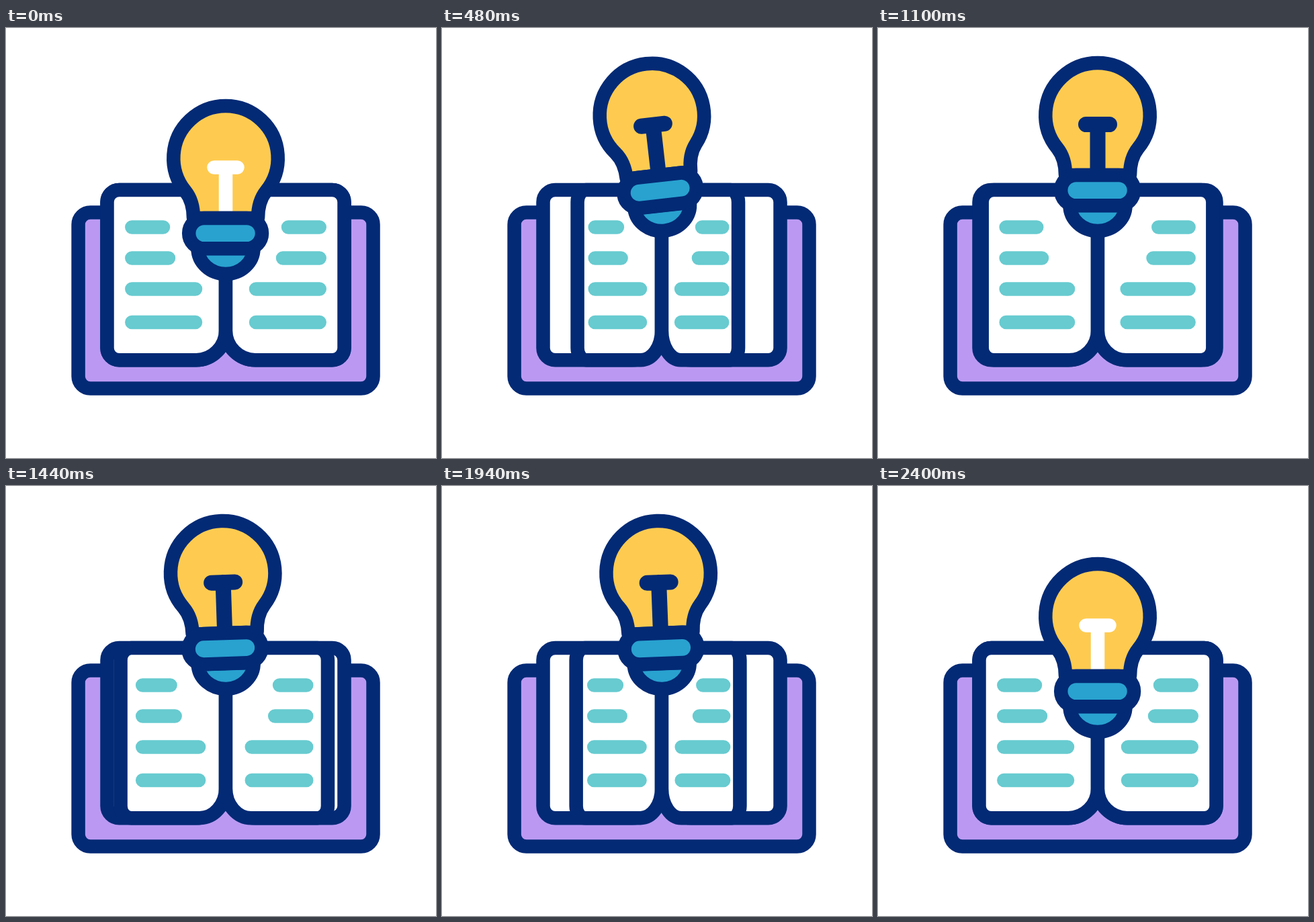
These frames come from a looping animation (640 by 640 pixels, 2620 ms). An HTML page with a canvas:

```html
<!DOCTYPE html>
<html lang="en">
<head>
<meta charset="utf-8">
<title>Book and bulb</title>
<style>
html, body { margin: 0; width: 100%; height: 100%; overflow: hidden; background: #fff; }
canvas { display: block; width: 640px; height: 640px; }
</style>
</head>
<body>
<canvas id="stage" width="640" height="640"></canvas>
<script>
const ctx = document.getElementById('stage').getContext('2d');
const LOOP = 2620, STEP = 20, END = 2400;
const NAVY = '#032a75', PURPLE = '#bb99f3', TEAL = '#67cbd0';
const YELLOW = '#fecb50', BLUE = '#29a2d0', WHITE = '#fff';
const LINE = 20.5, MID = 327;

// [time, value] keys, eased in and out between neighbours
const LIFT = [[0, 0], [400, 64], [2000, 64], [2400, 0]];
const TILT = [[0, 0], [400, -10], [600, 0], [1300, 0], [1800, -10], [2000, 0]];
const FOLD = [[0, 0], [600, 1], [1200, 0], [1800, 1], [2400, 0]];

// [y, inner end measured from the fold]
const TEXT_LINES = [[296.5, 93], [342.5, 85], [388.5, 45], [438, 45]];

const HEAD = new Path2D(
  'M279 283 C279 265 275 253 267 243 A77.7 77.7 0 1 1 387 243 C379 253 375 265 375 283 Z');
const CUP = new Path2D('M285.5 328 A41.5 38 0 0 0 368.5 328 Z');
const COLLAR = roundBox(272.2, 283, 381, 328.3, 22.6);
const COVER = roundBox(107.6, 274.6, 546.5, 536.5, 18);
const FILAMENT = new Path2D('M309.5 207.5 H344.5 M327 207.5 V283');

function roundBox(left, top, right, bottom, r) {
  const path = new Path2D();
  path.roundRect(left, top, right - left, bottom - top, r);
  return path;
}

function valueAt(keys, t) {
  for (let i = 1; i < keys.length; i++) {
    const [t0, a] = keys[i - 1], [t1, b] = keys[i];
    if (t <= t1) {
      const u = (t - t0) / (t1 - t0);
      return a + (b - a) * u * u * (3 - 2 * u);
    }
  }
  return keys[keys.length - 1][1];
}

function stroke(path, color, width = LINE) {
  ctx.strokeStyle = color;
  ctx.lineWidth = width;
  ctx.stroke(path);
}

function shape(path, fill) {
  ctx.fillStyle = fill;
  ctx.fill(path);
  stroke(path, NAVY);
}

// scale: signed width factor, negative for the left page
function page(scale) {
  const x = d => MID + d * scale;
  const path = new Path2D();
  const k = 0.5523;
  const corner = (d0, y0, d1, y1, d2, y2) => path.bezierCurveTo(
    x(d0 + (d1 - d0) * k), y0 + (y1 - y0) * k,
    x(d2 + (d1 - d2) * k), y2 + (y1 - y2) * k, x(d2), y2);
  path.moveTo(x(0), 241);
  path.lineTo(x(158.5), 241);
  corner(158.5, 241, 176.5, 241, 176.5, 259);
  path.lineTo(x(176.5), 476.2);
  corner(176.5, 476.2, 176.5, 494.2, 158.5, 494.2);
  path.lineTo(x(44), 494.2);
  corner(44, 494.2, 0, 494.2, 0, 450.2);
  path.closePath();
  shape(path, WHITE);
}

function turningPage(scale) {
  page(scale);
  const lines = new Path2D();
  for (const [y, inner] of TEXT_LINES) {
    lines.moveTo(MID + 139.7 * scale, y);
    lines.lineTo(MID + inner * scale, y);
  }
  stroke(lines, TEAL);
}

function bulb(t) {
  const pivotY = 323;
  ctx.save();
  ctx.translate(MID, pivotY - valueAt(LIFT, t));
  ctx.rotate(valueAt(TILT, t) * Math.PI / 180);
  ctx.translate(-MID, -pivotY);
  ctx.fillStyle = YELLOW;
  ctx.fill(HEAD);
  const lit = t >= 400 && t < 2000;
  stroke(FILAMENT, lit ? NAVY : WHITE, lit ? 23 : LINE);
  stroke(HEAD, NAVY);
  shape(CUP, BLUE);
  shape(COLLAR, BLUE);
  ctx.restore();
}

function draw(t) {
  ctx.fillStyle = WHITE;
  ctx.fillRect(0, 0, 640, 640);
  ctx.lineCap = ctx.lineJoin = 'round';
  shape(COVER, PURPLE);
  page(-1);
  page(1);
  const fold = valueAt(FOLD, t);
  turningPage(0.323 * fold - 1);
  turningPage(1 - 0.395 * fold);
  bulb(t);
}

const start = performance.now();
function tick() {
  const t = (performance.now() - start) % LOOP;
  draw(Math.min(END, Math.floor(t / STEP) * STEP));
  requestAnimationFrame(tick);
}
tick();
</script>
</body>
</html>
```
